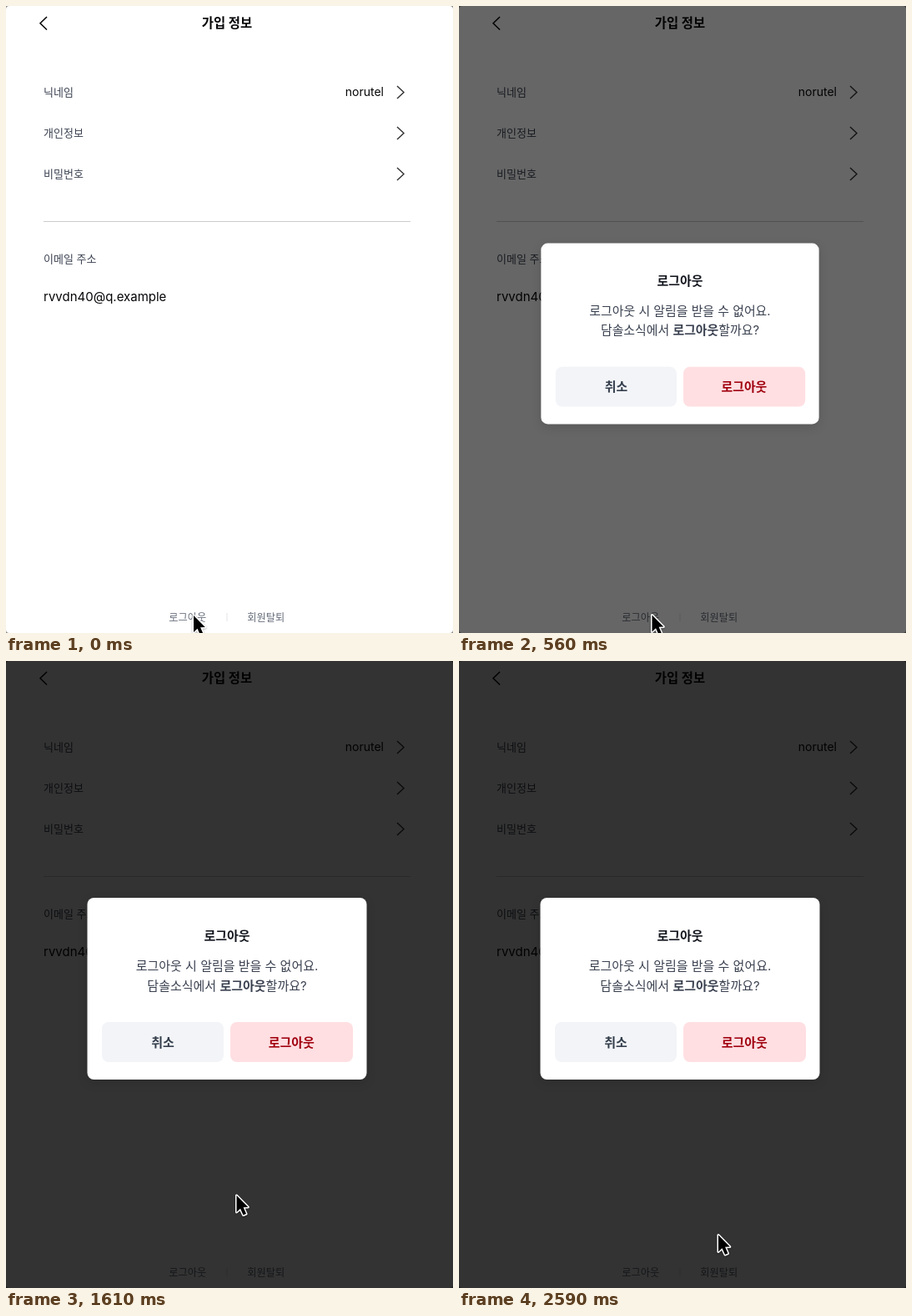
An HTML page that plays this animation: 536x752 px, repeating every 2800 ms.

```html
<!DOCTYPE html>
<html lang="ko">
<head>
<meta charset="utf-8">
<style>
  html, body { margin: 0; width: 100%; height: 100%; overflow: hidden; background: #888; }
  svg { display: block; width: 536px; height: 752px; }
  text { font: 13px Inter, "Noto Sans CJK KR", "Noto Sans CJK", sans-serif; fill: #3a4150; }
  .mid { text-anchor: middle; }
  .bold { font-weight: 700; }
  .big { font-size: 15px; }
  .ink { fill: #060609; }
  .foot text { font-size: 12.2px; fill: #656c7a; }
  .line { fill: none; stroke: #333; stroke-width: 1.4; }
  #modal { filter: drop-shadow(0 4px 6px rgba(0, 0, 0, .12)); }
  #ring rect { fill: none; stroke-width: 2; }
  #cursor { filter: drop-shadow(0 1px 1px rgba(0, 0, 0, .3)); }
</style>
</head>
<body>
<svg viewBox="0 0 536 752">
  <rect width="536" height="752" rx="4" fill="#fff"/>
  <path class="line" d="M49 13l-8 7.7 8 7.8" style="stroke:#000;stroke-width:1.5"/>
  <text class="mid bold ink" x="265" y="26" style="font-size:15.4px">가입 정보</text>

  <text x="45" y="108">닉네임</text>
  <text x="453" y="108.3" text-anchor="end" class="ink" style="font-size:14px">norutel</text>
  <text x="45" y="157">개인정보</text>
  <text x="45" y="206">비밀번호</text>
  <path class="line" d="M469 96l8 7.5-8 7.5m0 34l8 7.5-8 7.5m0 34l8 7.5-8 7.5"/>

  <rect x="45" y="258" width="440" height="1" fill="#ccc"/>
  <text x="45" y="308">이메일 주소</text>
  <text x="45" y="354.3" class="big ink">rvvdn40@q.example</text>

  <g class="foot">
    <text class="mid" x="217.7" y="737.7">로그아웃</text>
    <rect x="264.5" y="728" width="1" height="10" fill="#e3e5e9"/>
    <text class="mid" x="311.7" y="737.7">회원탈퇴</text>
  </g>

  <rect id="shade" width="536" height="752"/>

  <g id="modal">
    <rect x="97.5" y="284" width="335" height="218" rx="8" fill="#fff"/>
    <text class="mid bold big" x="265" y="334.5" style="fill:#14171f">로그아웃</text>
    <text class="mid big" x="265" y="370.5">로그아웃 시 알림을 받을 수 없어요.</text>
    <text class="mid big" x="265" y="394.5">담솔소식에서 <tspan class="bold">로그아웃</tspan>할까요?</text>
    <rect x="115" y="433" width="146" height="48" rx="8" fill="#f2f4f8"/>
    <text class="mid bold big" x="188" y="462.5" style="fill:#333d4b">취소</text>
    <rect x="269" y="433" width="147" height="48" rx="8" fill="#ffdfe2"/>
    <text class="mid bold big" x="342.3" y="462.5" style="fill:#a0000f">로그아웃</text>
    <g id="ring">
      <rect x="116.5" y="435" width="143" height="44" rx="6.5" stroke="#deeffc"/>
      <rect x="114.5" y="433" width="147" height="48" rx="8" stroke="#1d5a9b"/>
    </g>
  </g>

  <path id="cursor" d="M1.5 2V22L6 17.8 9.5 25.5 13 24 9.6 16.3 15.3 16Z"
        stroke="#fff" stroke-width="3" stroke-linejoin="round" paint-order="stroke"/>
</svg>
<script>
  const LOOP = 2800, TICK = 70;

  // pointer moves, in order
  const home = { x: 223.5, y: 729 };
  const glides = [
    { from: 70, to: 210, x: 230, y: 728.5 },
    { from: 560, to: 630, x: 229, y: 723.5 },
    { from: 630, to: 840, x: 342, y: 727 },
    { from: 1050, to: 1120, x: 275, y: 639 },
    { from: 1820, to: 2170, x: 310.5, y: 713.5 },
    { from: 2240, to: 2590, x: 309.5, y: 686.5 }
  ];

  const progress = (t, from, to) => Math.min(1, Math.max(0, (t - from) / (to - from)));
  const easeOut = p => 1 - (1 - p) ** 3;
  const set = (id, attrs) => {
    for (const name in attrs) document.getElementById(id).setAttribute(name, attrs[name]);
  };

  function pointerAt(t) {
    let { x, y } = home;
    for (const g of glides) {
      const p = easeOut(progress(t, g.from, g.to));
      x += (g.x - x) * p;
      y += (g.y - y) * p;
    }
    return `translate(${x} ${y})`;
  }

  function draw(now) {
    const t = Math.floor(now % LOOP / TICK) * TICK;
    const open = progress(t, 460, 593);
    const scale = .67 + .33 * easeOut(open);
    const focused = t >= 1120 && t < 1610;

    set('cursor', { transform: pointerAt(t) });
    set('shade', { opacity: .8 * open });
    set('modal', {
      opacity: Math.min(1, 1.75 * open),
      transform: `translate(265 393) scale(${scale}) translate(-265 -393)`
    });
    // focus steps from the left button to the right one
    set('ring', {
      visibility: focused ? 'visible' : 'hidden',
      transform: `translate(${t < 1400 ? 0 : 154.5} 0)`
    });
  }

  const start = performance.now();
  function frame() {
    draw(performance.now() - start);
    requestAnimationFrame(frame);
  }
  frame();
</script>
</body>
</html>
```
